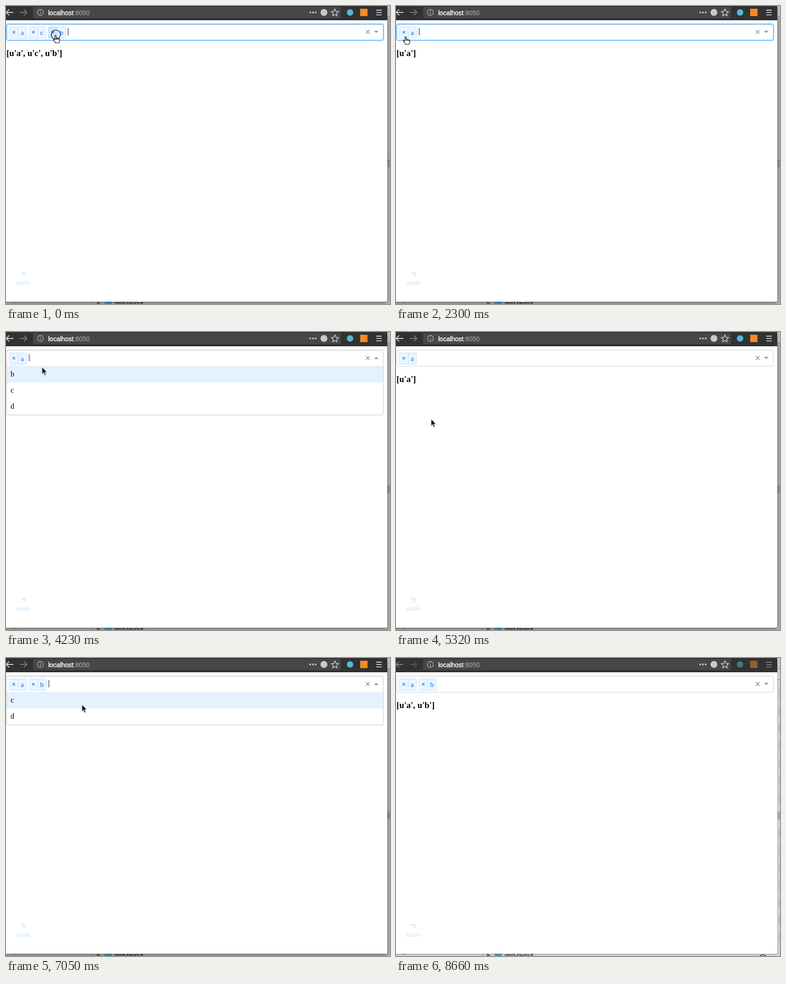
These frames come from a looping animation (837 by 649 pixels, 8760 ms). An HTML page:

```html
<!DOCTYPE html>
<html lang="en">
<head>
<meta charset="utf-8">
<title>Multi-select dropdown</title>
<style>
html, body { margin: 0; width: 837px; height: 649px; overflow: hidden; }
body { position: relative; font: 16px "Liberation Serif", serif; color: #000; background: #b4b4b4; }
body > * { position: absolute; box-sizing: border-box; }
svg { left: 0; top: 0; width: 837px; height: 649px; }
.sans { font-family: "Liberation Sans", sans-serif; }

#page { left: -6px; top: 0; width: 837px; height: 644px; background: #fff; border-radius: 0 0 4px 4px;
  box-shadow: 0 2px 9px rgba(0,0,0,.5); }
.idle { background: #d6d6d6; }
.idle #page { box-shadow: 0 1px 5px rgba(0,0,0,.3); }
.idle .dim { opacity: .5; }
#rows { display: none; }
.idle #rows { display: block; }

#value { left: 1px; top: 92px; margin: 0; font-size: 18.72px; line-height: 21px; white-space: pre; }
#control { left: 1px; top: 39px; width: 822px; height: 36px; background: #fff; border: 1px solid #ccc;
  border-radius: 4px; white-space: nowrap; }
#control.focus { border-color: #08f;
  box-shadow: inset 0 1px 1px rgba(0,0,0,.075), 0 0 0 3px rgba(0,136,255,.1); }
#control.open { border-color: #b3b3b3 #ccc #d9d9d9; border-radius: 4px 4px 0 0; }
.chip { display: inline-flex; vertical-align: top; margin: 5px 0 0 5px; font-size: 14.4px; line-height: 1.4;
  color: #007eff; -webkit-text-stroke: .2px; background: #ebf5ff; border: 1px solid #c2e0ff; border-radius: 2px; }
.chip b { padding: 1px 5px 2px; border-right: 1px solid #c2e0ff; }
.chip b.hover { background: #d0e6fc; color: #0071e6; }
.chip span { padding: 2px 5px; }
.hint { color: #aaa; line-height: 34px; padding-left: 10px; }
#caret { top: 48px; width: 1px; height: 16px; background: #000; }
#menu { left: 1px; top: 74px; width: 822px; background: #fff; border: 1px solid #ccc; border-top-color: #e6e6e6;
  border-radius: 0 0 4px 4px; box-shadow: 0 1px 0 rgba(0,0,0,.06); overflow: hidden; }
#menu div { height: 35px; line-height: 34px; padding-left: 8px; }
#menu .on { background: #e4f1ff; }
#tip { filter: drop-shadow(0 1px 1px rgba(0,0,0,.35)); }
</style>
</head>
<body>
<svg>
  <path d="M831 0h6v23h-6z" fill="#cfcfcf"/>
  <path d="M831 23.5h6M831 46.5h6M188.5 640v9" stroke="#8c8c8c"/>
  <path id="rows" d="M835 68V644" stroke="#c8c8c8" stroke-width="4" stroke-dasharray="19"/>
  <path class="dim" d="M831 334h6v17h-6z" fill="#989898"/>
  <path d="M198 643l8 4-8 5z" fill="#666"/>
  <path d="M215 640h16v9h-16z" fill="#3fa0cf"/>
</svg>
<div id="page"></div>
<svg>
  <text class="sans" x="237" y="652" font-size="13.3">grid-layout</text>
  <path d="M15 644q2.5 3 5 0" fill="none" stroke="#444"/>
  <path d="M0 636h831v4a4 4 0 0 1-4 4H0z" fill="#fff"/>

  <path d="M0 0h831v31H0z" fill="#323234"/>
  <path d="M0 30.5h831" stroke="#1b1b1d"/>
  <rect x="59" y="2" width="671" height="24.5" rx="3" fill="#474749"/>
  <g fill="none" stroke="#d2d2d3" stroke-width="1.8">
    <path class="dim" d="M16 14H1M7 7.5L.5 14 7 20.5"/>
    <path class="dim" d="M30 14h15M39 7.5l6.5 6.5-6.5 6.5" stroke="#7b7b7d"/>
    <path class="dim" d="M807 9h12M807 14.2h12M807 19.4h12"/>
    <g stroke="#bbbbbc" stroke-width="1.3">
      <circle cx="75" cy="14" r="6.5"/>
      <path d="M75 13v5M75 10v1.5"/>
    </g>
    <path d="M717 6.5l2.4 5 5.4.7-4 3.8 1 5.4-4.8-2.7-4.8 2.7 1-5.4-4-3.8 5.4-.7z" stroke-width="1.5"/>
  </g>
  <path d="M663 14h13" stroke="#c9c9ca" stroke-width="4" stroke-linecap="round" stroke-dasharray="0 6"/>
  <circle cx="693" cy="14" r="7.5" fill="#c9c9ca"/>
  <circle class="dim" cx="750" cy="14" r="7" fill="#4fb9d9"/>
  <path class="dim" d="M772 6h16v16h-16z" fill="#f68b1f"/>
  <text class="sans" x="92" y="20" font-size="14" fill="#b1b1b3"><tspan fill="#fff" stroke="#fff" stroke-width=".4">localhost</tspan>:8050</text>

  <path d="M35 581h4.5a3.2 3.2 0 0 1 0 6.4H36M37.5 578.5L35 581l2.5 2.5" fill="none" stroke="#c5e2fa" stroke-width="1.3"/>
  <text x="23" y="607" font-size="15" fill="#c5e2fa">undo</text>
</svg>

<h3 id="value"></h3>
<div id="control"></div>
<div id="menu"></div>
<div id="caret"></div>
<svg>
  <path id="clear" d="M784.5 52.5l8 8M792.5 52.5l-8 8" stroke="#8f8f8f" stroke-width="1.7"/>
  <path id="arrow" fill="#999"/>
  <g id="pointer" stroke-linejoin="round">
    <path id="tip" d="M.7.7V15.2L3.9 12.2 6.3 17.7 8.7 16.7 6.4 11.3H10.9Z" stroke="#fff"/>
    <path id="hand" fill="#fff" stroke="#000" stroke-width="1.2"
      d="M-1.5 10V2.2C-1.5.5 1.2.5 1.3 2.2V7C1.5 5.800 4 6 4 7.5 4.3 6.5 6.5 6.8 6.5 8.3 7 7.5 9 7.8 9 9.5V12.5C9 14.5 7.5 15 7.5 17.5H-.5C-.8 15-3.5 13-4.8 10.3-5.2 8.8-3.5 8-1.5 10ZM1.3 7V10M4 7.5V10.2M6.5 8.3V10.5"/>
    <circle id="ring" cx=".5" cy="-.5" r="10" fill="none" stroke="#000" stroke-width="1.2"/>
  </g>
</svg>

<script>
const LOOP = 8760, TICK = 60, BLINK = 500, LATENCY = 110, BLUR_AT = 8660;
const ROW = 35, MENU_TOP = 75, CHIP = 42.6;
const $ = id => document.getElementById(id);

// press, release, moment it takes effect, resulting mode and selection
const clicks = [
  [0, 60, 330, 'focus', 'ac'],
  [1050, 1110, 1890, 'focus', 'a'],
  [2420, 2480, 2840, 'focus', ''],
  [3540, 3600, 3540, 'open', ''],
  [3900, 3960, 3960, 'open', 'a'],
  [4880, 5160, 4880, '', 'a'],
  [5940, 6000, 5940, 'open', 'a'],
  [6540, 6600, 6600, 'open', 'ab'],
  [7270, 7390, 7270, '', 'ab'],
  [8590, LOOP, LOOP, '', 'ab']
].map(([press, release, at, mode, chosen]) => ({ press, release, at, mode, chosen }));
const first = { at: 0, mode: 'focus', chosen: 'acb' };

// places where the pointer rests: arrive, leave, x, y
const stops = [
  [0, 300, 108, 63], [1020, 1650, 67, 64], [2280, 2890, 21, 66], [3180, 3540, 66, 60],
  [3840, 4620, 78, 76], [4860, 5100, 78, 300], [5280, 5340, 76, 189], [5880, 6000, 108, 60],
  [6120, 6400, 144, 114], [6540, 6840, 153, 96], [7020, 7080, 165, 101],
  [7200, 7700, 180, 248], [8040, LOOP, 799, 657]
];

const clamp = (v, lo, hi) => Math.max(lo, Math.min(hi, v));
const stateAt = t => clicks.filter(c => c.at <= t).pop() || first;
const show = (el, on) => { el.style.display = on ? '' : 'none'; };

function pointerAt(t) {
  t = Math.floor(t / TICK) * TICK;
  const i = stops.findIndex(s => s[0] > t);
  const [, leave, x, y] = stops.at(i < 0 ? -1 : i - 1);
  if (i < 0 || t <= leave) return [x, y];
  const [arrive, , nextX, nextY] = stops[i];
  const k = (t - leave) / (arrive - leave);
  return [x + (nextX - x) * k, y + (nextY - y) * k];
}

function setHtml(el, html) {
  if (el.markup !== html) el.innerHTML = el.markup = html;
}

function render(t) {
  const { at, mode, chosen } = stateAt(t);
  const [x, y] = pointerAt(t);
  const open = mode === 'open';
  const hand = t < 2890;
  const removing = hand && clicks.some(c => t >= c.press && t < c.at);

  document.body.className = t >= BLUR_AT ? 'idle' : '';
  const printed = [...stateAt(t - LATENCY).chosen];
  $('value').textContent = '[' + printed.map(c => `u'${c}'`).join(', ') + ']';

  $('control').className = mode;
  setHtml($('control'), [...chosen].map((c, i) => {
    const hover = removing && i === chosen.length - 1 ? 'hover' : '';
    return `<div class="chip"><b class="${hover}">×</b><span>${c}</span></div>`;
  }).join('') || '<div class="hint">Select...</div>');

  const options = [...'abcd'].filter(c => !chosen.includes(c));
  const active = clamp(Math.floor((y - MENU_TOP) / ROW), 0, options.length - 1);
  show($('menu'), open);
  setHtml($('menu'), options.map((c, i) => `<div class="${i === active ? 'on' : ''}">${c}</div>`).join(''));

  show($('caret'), mode && Math.floor((t - at) / BLINK) % 2 === 0);
  $('caret').style.left = (chosen ? Math.floor(7.8 + CHIP * chosen.length) : 12) + 'px';
  show($('clear'), chosen);
  $('arrow').setAttribute('d', open ? 'M802 59h10l-5-5z' : 'M802 54h10l-5 5z');

  $('pointer').setAttribute('transform', `translate(${Math.round(x)} ${Math.round(y)})`);
  show($('hand'), hand);
  show($('tip'), !hand);
  show($('ring'), clicks.some(c => t >= c.press && t < c.release));
}

const start = performance.now();
function frame() {
  render((performance.now() - start) % LOOP);
  requestAnimationFrame(frame);
}
frame();
</script>
</body>
</html>
```
